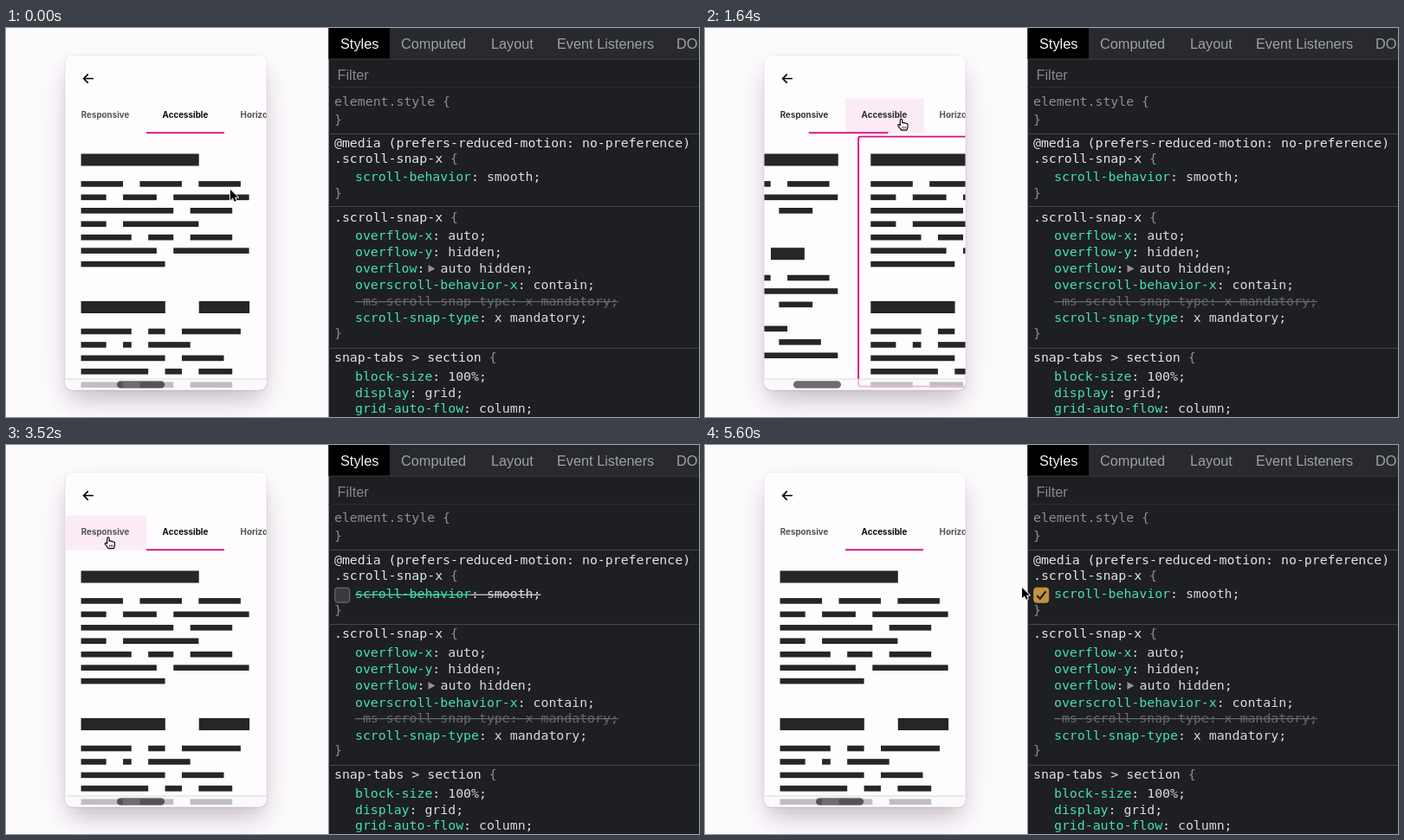
Recreate the animation shown at these times as an HTML page with a canvas. Size 800 by 450 pixels, loop 5640 ms.

```html
<!DOCTYPE html>
<html lang="en">
<head>
<meta charset="utf-8">
<title>Scroll snap tabs</title>
<style>
html, body { margin: 0; width: 100%; height: 100%; overflow: hidden; background: #fdfbfe; }
canvas { display: block; }
</style>
</head>
<body>
<canvas id="stage" width="800" height="450"></canvas>
<script>
const ctx = document.getElementById('stage').getContext('2d');
const LOOP = 5640;
const PAGE = 232;
const PINK = '#dc0f82';
const INK = '#282528';
const MONO = '14.85px "DejaVu Sans Mono", monospace';
const SANS = '16.3px "Liberation Sans", Arial, sans-serif';
const TAB = '700 9.8px Inter, sans-serif';
const PROP = '#45e0b2', VALUE = '#d8dadc', DIM = '#8b8e92', OFF = '#66696d';

// Block text: [centre y of first line, word lengths per line]
const pages = [
  { heads: [[152.5, [3, 5]], [261.2, [4, 2]]],
    paras: [[180.4, [[5, 5, 5], [3, 4, 9], [11, 4]]],
            [289, [[5, 5, 5], [3, 4, 9], [11, 4]]],
            [347.9, [[3, 9], [6, 3, 5], [9, 9], [10]]]] },
  { heads: [[152.5, [7]], [323, [5, 3]]],
    paras: [[180.4, [[5, 5, 5], [3, 4, 9], [11, 5], [3, 9], [6, 3, 5], [9, 9], [10]]],
            [351, [[6, 2, 7], [3, 1, 5], [10, 5], [8, 2, 4], [5, 4, 5]]]] }
];

// Pointer: [time, x, y]
const path = [
  [0, 259, 187], [340, 120, 104], [1110, 120, 104], [1310, 226.5, 105.5],
  [1840, 226.5, 105.5], [2270, 393, 172], [2900, 393, 172], [3360, 118, 107],
  [3700, 118, 107], [4080, 211, 114.5], [4700, 211, 114.5], [5260, 391, 172],
  [5440, 391, 172], [5600, 366, 165], [LOOP, 259, 187]
];
const presses = [[500, 580], [1350, 1430], [2440, 2530], [3530, 3620], [4240, 4380], [5320, 5400]];

const arrowShape = new Path2D('M0 0V12.2L2.8 9.6L4.7 13.8L6.8 12.9L5 8.8H8.8Z');
const handShape = new Path2D('M-1.2 6.2V.9Q-1.2 -.3 0 -.3T1.2 .9V4.2Q2.4 3.5 3.4 4.5Q4.7 3.9 5.5 5' +
  'Q7.5 4.8 7.5 6.6V9Q7.4 10.7 6.4 12.6H.2Q-1 10.4 -3.2 8.3Q-4.2 7 -3.2 6.2Q-2.2 5.8 -1.2 7.2Z');

const within = (t, a, b) => t >= a && t < b;
const mix = (a, b, k) => a + (b - a) * k;
const ease = k => k < .5 ? 2 * k * k : 1 - 2 * (1 - k) * (1 - k);
const ramp = (t, a, b) => ease(Math.min(1, Math.max(0, (t - a) / (b - a))));

function pointer(t) {
  const i = Math.max(1, path.findIndex(p => p[0] > t));
  const a = path[i - 1], b = path[i];
  const k = ramp(t, a[0], b[0]);
  return { x: mix(a[1], b[1], k), y: mix(a[2], b[2], k) };
}

function scrollAt(t) {
  if (t < 1430) return 1 - ramp(t, 580, 980);
  if (t < 3620) return ramp(t, 1430, 1830);
  return t < 4380 ? 0 : 1;
}

function focusAt(t) {
  if (within(t, 580, 1350) || within(t, 3620, 4240)) return 0;
  if (within(t, 1430, 2440) || within(t, 4380, 5320)) return 1;
  return -1;
}

function rect(x, y, w, h, color) {
  ctx.fillStyle = color;
  ctx.fillRect(x, y, w, h);
}

function round(x, y, w, h, r) {
  ctx.beginPath();
  ctx.roundRect(x, y, w, h, r);
}

function text(s, x, y, color, font) {
  ctx.font = font;
  ctx.fillStyle = color;
  ctx.fillText(s, x, y);
}

function words(lengths, x, y, unit, h) {
  for (const n of lengths) {
    rect(x, y - h / 2, n * unit, h, INK);
    x += (n + 2) * unit;
  }
}

function drawPage(page, x) {
  for (const [y, line] of page.heads) words(line, x, y, 19.45, 14);
  for (const [y, lines] of page.paras)
    lines.forEach((line, i) => words(line, x, y + i * 15.45, 9.7, 6.6));
}

function shadow(inset, blur, dy, color) {
  ctx.save();
  ctx.shadowColor = color;
  ctx.shadowBlur = blur;
  ctx.shadowOffsetY = dy;
  ctx.fillStyle = '#fefcff';
  round(68.5 + inset, 32 + inset, 232 - 2 * inset, 386.5 - 2 * inset, 8);
  ctx.fill();
  ctx.restore();
}

function drawPhone(t, p) {
  rect(0, 0, 373, 450, '#fdfbfe');
  shadow(6, 46, 16, 'rgba(70,45,65,.13)');
  shadow(4, 24, 14, 'rgba(70,45,65,.22)');
  shadow(0, 2, .5, 'rgba(60,40,60,.25)');

  const s = scrollAt(t);
  ctx.save();
  round(68.5, 32, 232, 386.5, 8);
  ctx.fillStyle = '#fefcff';
  ctx.fill();
  ctx.clip();

  ctx.strokeStyle = '#000';
  ctx.lineWidth = 1.7;
  ctx.beginPath();
  ctx.moveTo(101, 58.5);
  ctx.lineTo(90, 58.5);
  ctx.moveTo(94.8, 53.4);
  ctx.lineTo(89.7, 58.5);
  ctx.lineTo(94.8, 63.6);
  ctx.stroke();

  if (overTabs(p)) {
    if (p.x < 162) rect(68.5, 81.5, 93.5, 40, '#fbebf4');
    else if (p.x < 252.5) rect(162, 81.5, 90.5, 40, '#fbebf4');
  }
  const shade = k => { const v = mix(84, 12, k); return `rgb(${v},${v},${v})`; };
  text('Responsive', 86.8, 104.2, shade(1 - s), TAB);
  text('Accessible', 180.6, 104.2, shade(s), TAB);
  text('Horizontal', 270.6, 104.2, shade(0), TAB);
  rect(68.5 + 93.5 * s, 120.3, mix(93.5, 90, s), 1.9, PINK);

  ctx.beginPath();
  ctx.rect(68, 122.2, 233, 297);
  ctx.clip();
  const focus = focusAt(t);
  pages.forEach((page, i) => {
    const dx = (i - s) * PAGE;
    drawPage(page, 86.6 + dx);
    if (focus === i) {
      ctx.strokeStyle = PINK;
      ctx.lineWidth = 1.9;
      round(72.4 + dx, 125.6, 224.4, 289, 2.5);
      ctx.stroke();
    }
  });

  rect(68, 406, 233, 13, 'rgba(250,250,250,.72)');
  rect(68, 405.6, 233, .9, 'rgba(205,203,205,.8)');
  ctx.fillStyle = 'rgba(0,0,0,.56)';
  round(70.3 + 57.8 * s, 408.2, 55, 8.6, 4.3);
  ctx.fill();
  ctx.restore();
}

function code(x, y, ...parts) {
  for (let i = 0; i < parts.length; i += 2) {
    text(parts[i], x, y + 4.6, parts[i + 1], MONO);
    x += ctx.measureText(parts[i]).width;
  }
  return x;
}

const rule = (y, name) => code(379, y, name + ' ', '#e3e4e6', '{', DIM);
const prop = (y, name, value) => code(403, y, name, PROP, ': ' + value + ';', VALUE);

function strike(y, end, color) {
  rect(403, y - .4, end - 403, 1.2, color);
}

function checkbox(on) {
  round(379.7, 165.2, 17, 17, 3);
  ctx.fillStyle = on ? '#c4933d' : '#393a3c';
  ctx.fill();
  ctx.strokeStyle = on ? '#c4933d' : '#777779';
  ctx.lineWidth = 1;
  ctx.stroke();
  if (!on) return;
  ctx.strokeStyle = '#202124';
  ctx.lineWidth = 2.2;
  ctx.beginPath();
  ctx.moveTo(383.2, 174.2);
  ctx.lineTo(386.8, 177.8);
  ctx.lineTo(393.5, 169.3);
  ctx.stroke();
}

function drawTools(t, p) {
  rect(372.5, 0, 428, 450, '#1e1f22');
  rect(372.5, 0, 428, 36, '#292a2d');
  rect(372.5, 0, 70.5, 36, '#000');
  rect(372.5, 35.5, 428, 1, '#3a3b3e');
  rect(372.5, 68, 428, 1, '#2b2c2f');
  text('Styles', 386, 24, '#f4f5f6', SANS);
  [['Computed', 456], ['Layout', 560], ['Event Listeners', 636], ['DOM Breakpoints', 774]]
    .forEach(([s, x]) => text(s, x, 24, '#9da1a6', SANS));
  text('Filter', 382.5, 60, '#85888c', SANS);

  const off = within(t, 2530, 5400);
  const nudge = t >= 2530 ? 1 : 0;
  for (const y of [122 - nudge, 206 + nudge, 370]) rect(372.5, y, 428, 1, '#46484b');

  code(379, 85.5 - nudge, 'element.style {', DIM);
  code(379, 106 - nudge, '}', DIM);
  code(379, 133, '@media (prefers-reduced-motion: no-preference)', '#e3e4e6');
  rule(151, '.scroll-snap-x');
  const end = prop(172.6, 'scroll-behavior', 'smooth');
  if (off) {
    strike(173, 537, PROP);
    rect(537, 172.6, end - 537, 1.2, VALUE);
  }
  code(379, 191, '}', DIM);

  rule(219.3 - nudge / 2, '.scroll-snap-x');
  prop(240.5, 'overflow-x', 'auto');
  prop(259.3, 'overflow-y', 'hidden');
  code(403, 278.5, 'overflow', PROP, ':', VALUE);
  ctx.fillStyle = '#8f9296';
  ctx.beginPath();
  ctx.moveTo(487.5, 274);
  ctx.lineTo(495.5, 278.4);
  ctx.lineTo(487.5, 282.8);
  ctx.fill();
  code(501.5, 278.5, 'auto hidden;', VALUE);
  prop(297 + nudge, 'overscroll-behavior-x', 'contain');
  strike(316.4, code(403, 316, '-ms-scroll-snap-type: x mandatory;', OFF), OFF);
  prop(335 + nudge, 'scroll-snap-type', 'x mandatory');
  code(379, 353.5, '}', DIM);

  rule(381, 'snap-tabs > section');
  prop(403, 'block-size', '100%');
  prop(422, 'display', 'grid');
  prop(440.7, 'grid-auto-flow', 'column');

  if (t > 2530 || (t > 1840 && p.x > 373)) checkbox(!off);
}

const overTabs = p => within(p.y, 81.5, 121.5) && within(p.x, 69, 300);

function drawPointer(t, p) {
  if (presses.some(([a, b]) => within(t, a, b))) {
    ctx.beginPath();
    ctx.arc(p.x, p.y + .3, 23.5, 0, 7);
    ctx.strokeStyle = 'rgba(255,255,255,.55)';
    ctx.lineWidth = 3;
    ctx.stroke();
    ctx.strokeStyle = '#161316';
    ctx.lineWidth = 1.5;
    ctx.stroke();
  }
  ctx.save();
  ctx.translate(p.x, p.y);
  ctx.lineJoin = 'round';
  if (overTabs(p)) {
    ctx.fillStyle = '#fff';
    ctx.fill(handShape);
    ctx.strokeStyle = '#000';
    ctx.lineWidth = 1.15;
    ctx.stroke(handShape);
    ctx.lineWidth = .7;
    ctx.stroke(new Path2D('M1.6 8.2V11M3.4 8.2V11M5.2 8.2V11'));
  } else {
    ctx.strokeStyle = '#fff';
    ctx.lineWidth = 1.8;
    ctx.stroke(arrowShape);
    ctx.fillStyle = '#000';
    ctx.fill(arrowShape);
  }
  ctx.restore();
}

function draw(t) {
  const p = pointer(t);
  drawPhone(t, p);
  drawTools(t, p);
  drawPointer(t, p);
}

let start;
function tick(now) {
  start ??= now;
  draw(Math.max(0, now - start) % LOOP);
  requestAnimationFrame(tick);
}
draw(0);
requestAnimationFrame(tick);
</script>
</body>
</html>
```
